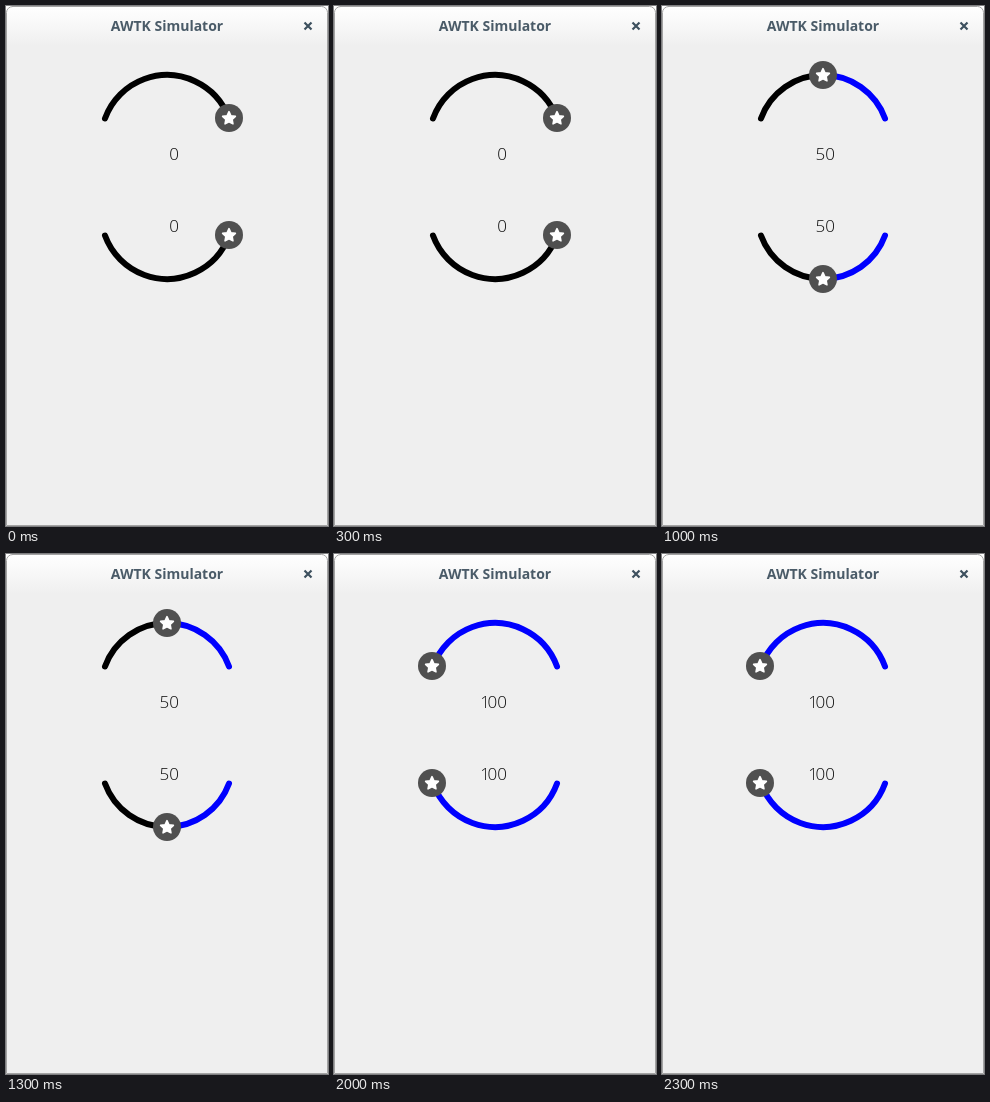
These frames come from a looping animation (322x520 px, 2500 ms). An HTML page with a canvas:

```html
<!DOCTYPE html>
<html lang="en">
<head>
<meta charset="utf-8">
<title>Arc sliders</title>
<style>
  html, body { margin: 0; width: 100%; height: 100%; overflow: hidden; background: #fff; }
  canvas { display: block; }
</style>
</head>
<body>
<canvas id="stage" width="322" height="520"></canvas>
<script>
const ctx = document.getElementById('stage').getContext('2d');
const CX = 161, RADIUS = 66, STEP_MS = 500, STEPS = 5;
const rad = deg => deg * Math.PI / 180;

function drawWindow() {
  ctx.fillStyle = '#fff';
  ctx.fillRect(0, 0, 322, 520);
  const shade = ctx.createLinearGradient(0, 1, 0, 40);
  shade.addColorStop(0, '#fff');
  shade.addColorStop(1, '#efefef');
  ctx.beginPath();
  ctx.roundRect(0.5, 0.5, 321, 519, [6, 6, 0, 0]);
  ctx.fillStyle = shade;
  ctx.fill();
  ctx.strokeStyle = '#a3a3a3';
  ctx.lineWidth = 1;
  ctx.stroke();

  ctx.fillStyle = '#4a5b68';
  ctx.font = '700 14px "Open Sans", sans-serif';
  ctx.textAlign = 'center';
  ctx.fillText('AWTK Simulator', CX, 25);

  ctx.beginPath();
  ctx.moveTo(298.5, 16.5);
  ctx.lineTo(305.5, 23.5);
  ctx.moveTo(305.5, 16.5);
  ctx.lineTo(298.5, 23.5);
  ctx.strokeStyle = '#3d505e';
  ctx.lineWidth = 2.2;
  ctx.lineCap = 'butt';
  ctx.stroke();
}

// side is -1 for the upper arc and 1 for the lower one
function drawArc(cy, side, from, to, color) {
  ctx.beginPath();
  ctx.arc(CX, cy, RADIUS, rad(side * from), rad(side * to), side < 0);
  ctx.strokeStyle = color;
  ctx.lineWidth = 6;
  ctx.lineCap = 'round';
  ctx.stroke();
}

function drawKnob(x, y) {
  ctx.beginPath();
  ctx.arc(x, y, 14, 0, 2 * Math.PI);
  ctx.fillStyle = '#505050';
  ctx.fill();
  ctx.beginPath();
  for (let i = 0; i < 10; i++) {
    const a = rad(i * 36 - 90), r = i % 2 ? 3.3 : 6.7;
    ctx.lineTo(x + r * Math.cos(a), y + 0.4 + r * Math.sin(a));
  }
  ctx.closePath();
  ctx.fillStyle = ctx.strokeStyle = '#fff';
  ctx.lineWidth = 1.6;
  ctx.lineJoin = 'round';
  ctx.fill();
  ctx.stroke();
}

function drawValue(value, baseline) {
  ctx.fillStyle = '#111';
  ctx.font = '300 17px "Open Sans", sans-serif';
  ctx.textAlign = 'right';
  const text = String(value);
  ctx.fillText(text.slice(-2), 173, baseline);
  // the leading 1 sits close to the zeros
  if (text.length > 2) ctx.fillText(text[0], 156, baseline);
}

function drawSlider(cy, side, value, baseline) {
  const angle = 20 + 1.4 * value;
  drawArc(cy, side, angle, 160, '#000');
  if (value) drawArc(cy, side, 20, angle, '#00f');
  drawKnob(
    Math.floor(CX + RADIUS * Math.cos(rad(angle))),
    Math.floor(cy + side * RADIUS * Math.sin(rad(angle)) + 1e-6)
  );
  drawValue(value, baseline);
}

function render() {
  const value = 25 * (Math.floor(performance.now() / STEP_MS) % STEPS);
  drawWindow();
  drawSlider(135, -1, value, 154);
  drawSlider(207, 1, value, 226);
  requestAnimationFrame(render);
}
render();
</script>
</body>
</html>
```
